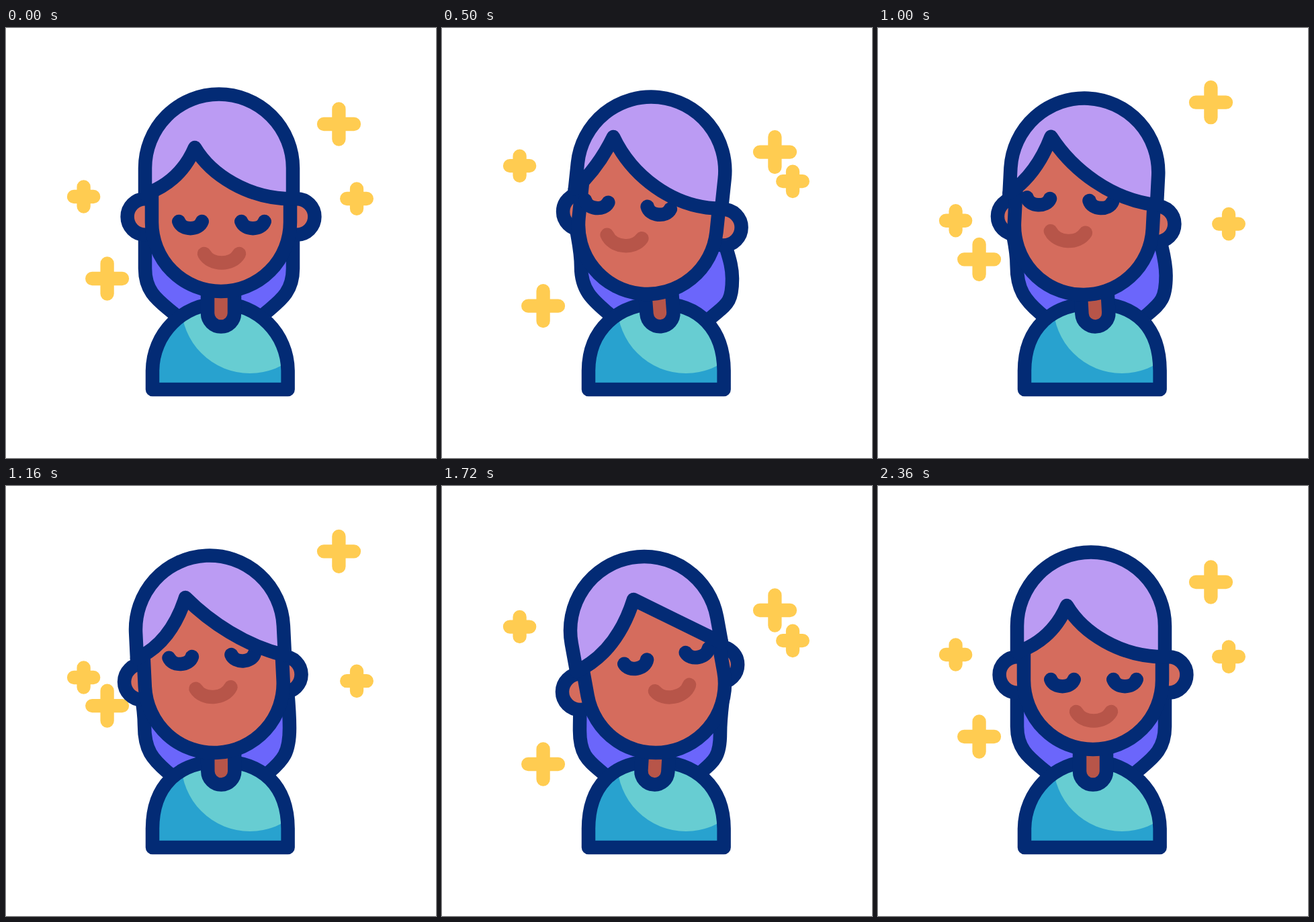
Write an HTML page that moves like this. It is 640 px wide and 640 px high and loops after 2400 ms.

```html
<!DOCTYPE html>
<html lang="en">
<head>
<meta charset="utf-8">
<title>Head tilt</title>
<style>
  html, body { margin: 0; width: 100%; height: 100%; overflow: hidden; background: #fff; }
  svg { display: block; width: 100vw; height: 100vh; }
  .line { stroke: #032b75; stroke-width: 20.5; stroke-linecap: round; stroke-linejoin: round; }
  .star { fill: none; stroke: #ffcc51; stroke-width: 20.3; stroke-linecap: round; }
  .skin { fill: #d56c5d; }
  .none { fill: none; }
</style>
</head>
<body>
<svg viewBox="0 0 640 640">
  <defs><clipPath id="clip"><path id="bodyClip"/></clipPath></defs>
  <path class="star" id="bigL" d="M128.2 373H173M150.6 350.5V395.5"/>
  <path class="star" id="bigR" d="M473 143H518M495.4 120.5V165.5"/>
  <path class="star" id="smallL" d="M101 251H130.2M115.6 236.4V265.6"/>
  <path class="star" id="smallR" d="M507.2 254H536.8M522 239.4V268.8"/>
  <path class="line" id="backHair" fill="#6b66fb"/>
  <path id="body" fill="#28a2cf"/>
  <circle cx="363" cy="412" r="102" fill="#67cdd2" clip-path="url(#clip)"/>
  <path class="line none" id="bodyLine"/>
  <path class="line" id="neck" fill="#b75549" d="M300 375V424.5A20 20 0 0 0 340 424.5V375Z"/>
  <circle class="line skin" id="earL" r="26.7"/>
  <circle class="line skin" id="earR" r="26.7"/>
  <path class="line skin" id="face"/>
  <g id="features">
    <path class="line none" d="M-63.7 -48C-59 -34.5 -34 -34.5 -29.3 -48M29.3 -48C34 -34.5 59 -34.5 63.7 -48"/>
    <path class="line none" style="stroke:#b75549" d="M-26 0C-16 18 16 18 26 0"/>
  </g>
  <path class="line" id="hair" fill="#bb9bf3"/>
</svg>
<script>
const LOOP = 2400, STEP = 20;
const $ = id => document.getElementById(id);
const set = (id, name, value) => $(id).setAttribute(name, value);

// Smooth curve through [time, value] keys; "flat" stops at every turning point.
function curve(keys, flat) {
  const slope = keys.map(([t, v], i) => {
    const a = keys[i - 1], b = keys[i + 1];
    if (!a || !b || (flat && (v - a[1]) * (b[1] - v) <= 0)) return 0;
    return (b[1] - a[1]) / (b[0] - a[0]);
  });
  return time => {
    const last = keys.length - 1;
    if (time >= keys[last][0]) return keys[last][1];
    let i = 0;
    while (time >= keys[i + 1][0]) i++;
    const [t0, v0] = keys[i], [t1, v1] = keys[i + 1];
    const d = t1 - t0, u = (time - t0) / d, w = 1 - u;
    return v0 * w * w * (1 + 2 * u) + v1 * u * u * (3 - 2 * u)
      + d * u * w * (slope[i] * w - slope[i + 1] * u);
  };
}

const stars = {
  bigL: [[0, 0], [560, 42], [820, 7], [1150, -46], [1400, -15], [1720, 41], [2010, 67], [2160, 53], [2360, 0]],
  bigR: [[0, 0], [560, 43], [820, 4], [1130, -46.5], [1400, -10], [1720, 42], [2010, 67], [2160, 53], [2360, 0]],
  smallL: [[0, 0], [440, -48], [1080, 39.5], [1600, -47], [2160, 0]],
  smallR: [[0, 0], [440, -27.5], [1080, 40.5], [1600, -27], [2160, 0]]
};
for (const id in stars) stars[id] = curve(stars[id], true);

// Head pose at these times; it returns to the first value at the last one.
const TIMES = [0, 500, 820, 1160, 1400, 1720, 2160];
const pose = {
  tilt: [0, 6, 7.7, -2.8, -11, -10.3],
  domeX: [317, 311.3, 311, 303, 296, 301],
  domeY: [208.5, 212.5, 214, 213.5, 216.5, 215],
  faceX: [320, 306, 303, 309.7, 315.5, 318],
  faceY: [289, 293, 294, 294, 295, 294],
  mouthX: [321, 271.5, 261.5, 308.5, 345, 342.5],
  mouthY: [336, 310.5, 306.5, 300.5, 295.5, 300.5],
  tuckL: [0, 12, 15, 6, 0, 0],
  tuckR: [0, 0, 0, 9, 16.5, 14],
  partX: [281, 255, 250, 267, 282, 285],
  partY: [178, 162, 158, 166, 168, 169],
  sideL: [39, 39, 38, 38, 42, 42],
  sideR: [46, 45, 43.5, 44, 35.5, 38.5],
  bend: [1, 1, 1, 0.5, -0.05, 0],
  backLX: [207, 207, 207, 206, 204, 205],
  backLY: [358, 355, 352, 356, 368, 364],
  backRX: [427, 432, 434, 422, 412, 414],
  backRY: [358, 373, 378, 360, 365, 368],
  tipL: [251, 248, 243, 240, 237, 240],
  tipR: [384, 401, 403, 391, 380, 382],
  swell: [0, 0.7, 1, 1, 1, 0.9],
  neck: [0, -4.3, -5.7, -0.3, 4, 3.5]
};
for (const k in pose) {
  const v = pose[k];
  pose[k] = curve(TIMES.map((t, i) => [t, v[i % v.length]]));
}

const pt = p => p[0].toFixed(2) + ' ' + p[1].toFixed(2);
const mix = (a, b, fx, fy) => [a[0] + (b[0] - a[0]) * fx, a[1] + (b[1] - a[1]) * fy];

function draw(time) {
  for (const id in stars) set(id, 'transform', `translate(0 ${stars[id](time).toFixed(2)})`);

  const p = {};
  for (const k in pose) p[k] = pose[k](time);
  const a = p.tilt * Math.PI / 180, c = Math.cos(a), s = Math.sin(a);
  const from = (x, y, dx, dy) => [x + dx * c - dy * s, y + dx * s + dy * c];
  const dome = (dx, dy) => from(p.domeX, p.domeY, dx, dy);
  const A = dome(-110, p.sideL), B = dome(110, p.sideR);

  // Hair behind the head: from the temples down to the shoulders
  const lock = (top, x, y, tip, side) => {
    const dy = y - top[1], end = [tip, 426 + (y - 358) * 0.3];
    return [top, [top[0] - s * dy * 0.45, top[1] + c * dy * 0.45], [x, y - dy * 0.35], [x, y],
      [x, y + 37], [end[0] + side * 22, end[1] - 19], end, [end[0] - side * 16, end[1] + 13]].map(pt);
  };
  const L = lock(A, p.backLX, p.backLY, p.tipL, -1);
  const R = lock(B, p.backRX, p.backRY, p.tipR, 1);
  set('backHair', 'd',
    `M${L[0]}C${L[1]} ${L[2]} ${L[3]}C${L[4]} ${L[5]} ${L[6]}L${L[7]}` +
    `L${R[7]}L${R[6]}C${R[5]} ${R[4]} ${R[3]}C${R[2]} ${R[1]} ${R[0]}Z`);

  // Shoulders lean with the neck
  const x = 318.8 - p.neck * 0.9, h = 55.8 + 8 * p.swell;
  const body = `M218 538V511C218 ${511 - h} ${x - h} 410 ${x} 410` +
    `C${x + h} 410 419.6 ${511 - h} 419.6 511V538Z`;
  for (const id of ['body', 'bodyLine', 'bodyClip']) set(id, 'd', body);
  set('neck', 'transform', `rotate(${p.neck.toFixed(2)} 320 365)`);

  // Ears and face
  const ear = (id, side, tuck) => {
    const e = from(p.faceX, p.faceY, side * 112.7, -8);
    set(id, 'cx', e[0] - side * tuck);
    set(id, 'cy', e[1]);
  };
  ear('earL', -1, p.tuckL);
  ear('earR', 1, p.tuckR);
  const face = (dx, dy) => from(p.faceX, p.faceY, dx, dy);
  const part = [p.partX, p.partY];
  set('face', 'd', `M${pt(face(-103, -55))}L${pt(face(-103, 0))}` +
    `A103 103 0 0 0 ${pt(face(103, 0))}L${pt(face(103, -55))}L${pt(part)}Z`);
  set('features', 'transform',
    `translate(${p.mouthX.toFixed(2)} ${p.mouthY.toFixed(2)}) rotate(${p.tilt.toFixed(2)})`);

  // Front hair with its parting; the left fringe straightens as it turns away
  const q = p.bend, b = 1 - Math.max(0, p.tilt) / 11;
  set('hair', 'd', `M${pt(A)}L${pt(dome(-110, 0))}A110 110 0 0 1 ${pt(dome(110, 0))}L${pt(B)}` +
    `C${pt(mix(part, B, 0.667 - 0.127 * q, 0.667 + 0.333 * q))} ` +
    `${pt(mix(part, B, 0.333 - 0.17 * q, 0.333 + 0.19 * q))} ${pt(part)}` +
    `C${pt(mix(part, A, 0.333 - 0.133 * b, 0.333 + 0.167 * b))} ` +
    `${pt(mix(part, A, 0.667 - 0.117 * b, 0.667 + 0.163 * b))} ${pt(A)}Z`);
}

function frame() {
  const t = performance.now() % LOOP;
  draw(Math.floor(t / STEP) * STEP);
  requestAnimationFrame(frame);
}
draw(0);
requestAnimationFrame(frame);
</script>
</body>
</html>
```
